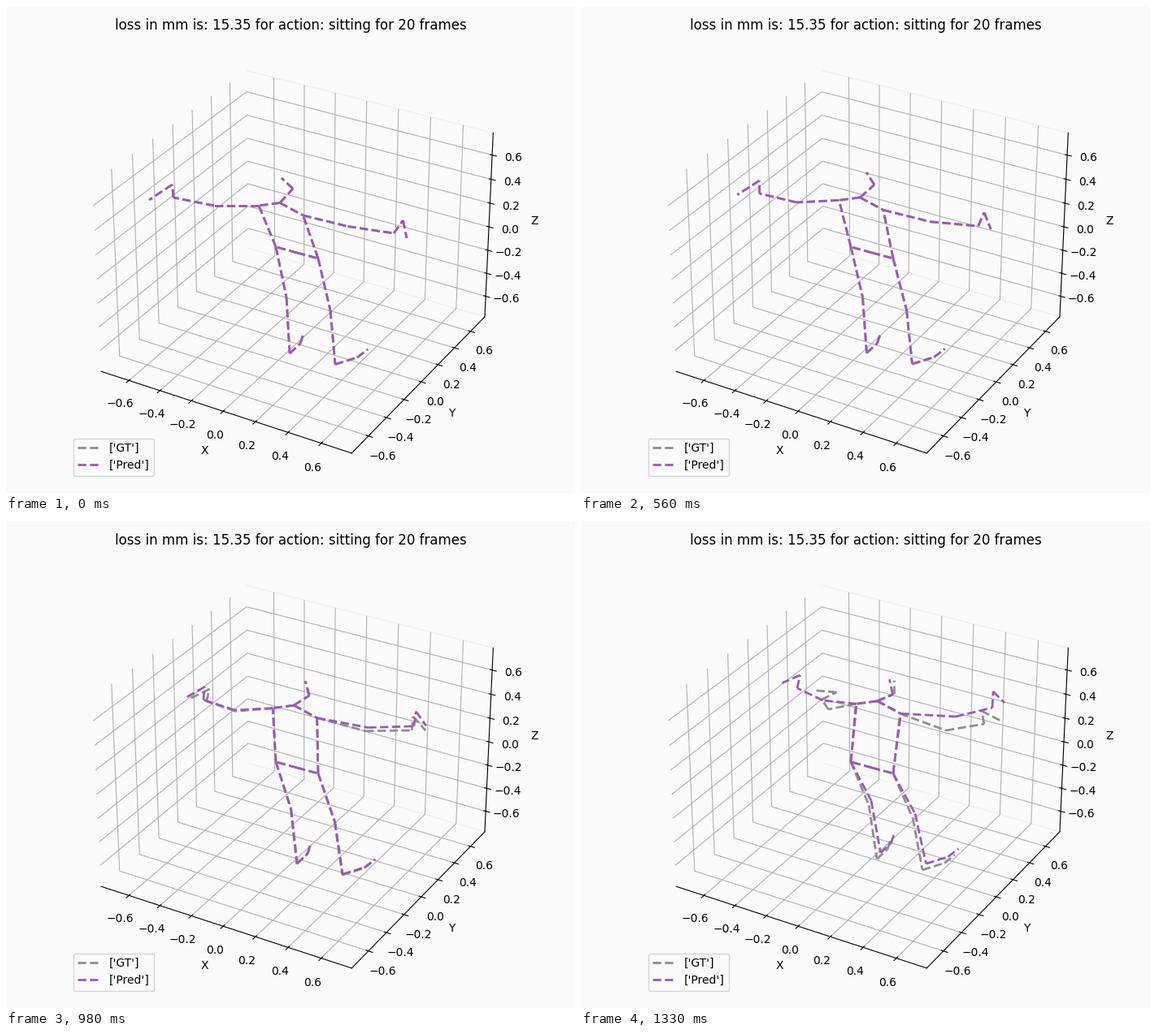
Write a matplotlib script that moves like this. It is 700 by 600 pixels and loops after 1.4 s.

```python
import matplotlib.pyplot as plt
import numpy as np
from matplotlib.animation import FuncAnimation

W, H, STEPS = 700, 600, 20
LAST = STEPS - 1
SPLIT = 11  # step at which the two poses begin to part
BG, GRAY, PURPLE = "#fafafa", "#8e8e8e", "#9b59b6"
STILL = (0, 0)


def ease(u, lead):
    """Quadratic start; a higher lead reaches the end sooner."""
    return u**2 * (1 + np.array(lead) * (1 - u))


def joint(start, shift=STILL, lead=STILL, gap=STILL, power=2.1):
    """Path of one joint in pixels; gap is how far the true pose ends from the predicted one."""
    start, shift, gap = map(np.array, (start, shift, gap))

    def at(step, true):
        point = start + shift * ease(step / LAST, lead)
        if true:
            point = point + gap * (max(step - SPLIT, 0) / (LAST - SPLIT)) ** power
        return point

    return at


# Hips stay fixed and the trunk swings as one piece
joints = {"root": joint((358, 304)), "r_hip": joint((332, 296.8)), "l_hip": joint((384, 311))}
for name, start in {"neck": (337, 242.5), "r_shoulder": (311, 246), "l_shoulder": (365.5, 258)}.items():
    joints[name] = joint(start, (28, -20.7), (0.5, 1.4), (-1, 0))
joints["chin"] = joint((353, 225), (30.5, -11), (0.8, 2.5), (1, -1))
joints["crown"] = joint((339, 212), (40.5, -17), (1.2, 2.3), (5, 1))

# Arms: start, shift and gap of each joint
swing = dict(lead=(0.5, -0.15))
joints["r_elbow"] = joint((256, 246), (41.5, -25), gap=(7, 11), **swing)
joints["r_wrist"] = joint((206, 236), (60, -30), gap=(30, 14), **swing)
joints["r_thumb"] = joint((204.5, 220), (65, -30), gap=(45, 21), **swing)
joints["r_tip"] = joint((176, 239), (71.5, -39.5), gap=(38, 9), **swing)

reach = dict(lead=(2.2, 0), power=1.4)
joints["l_elbow"] = joint((420.5, 271.5), (40.5, -30.5), (0.5, 0.1), (-12, 17), 1.4)
joints["l_wrist"] = joint((477, 280), (29, -50), gap=(-10, 20), **reach)
joints["l_thumb"] = joint((488.5, 264), (18.5, -54), gap=(-14, 24), **reach)
joints["l_tip"] = joint((493, 286), (28, -62), gap=(-3, 23), **reach)

# Legs: knees move less than feet, and the true pose lags behind by a share
LEG = ["knee", "ankle", "foot", "toe"]
leg_starts = {
    "r_": [(345, 359), (349, 428), (362, 416), (365.5, 405)],
    "l_": [(399, 375), (405, 441.5), (432, 433), (445, 423)],
}
for side, starts in leg_starts.items():
    for part, start in zip(LEG, starts):
        dx, dy = (12, -14.5) if part == "knee" else (19.5, -19.3)
        joints[side + part] = joint(start, (dx, dy), (-0.5, -1.5), (-0.23 * dx, -0.4 * dy))

ARM = ["shoulder", "elbow", "wrist", "thumb", "tip"]
bones = [("root", "r_hip"), ("root", "l_hip"),
         ("neck", "r_shoulder"), ("neck", "l_shoulder"),
         ("neck", "chin"), ("chin", "crown")]
for side in ("r_", "l_"):
    for limb in (LEG, ARM):
        chain = [side + part for part in ["hip"] + limb]
        bones += zip(chain, chain[1:])


fig = plt.figure(figsize=(W / 100, H / 100), dpi=100, facecolor=BG)

SIDE = 548.6
ax = fig.add_axes([75.7 / W, 14.5 / H, SIDE / W, SIDE / H], projection="3d")
ax.set_facecolor(BG)
LIM = 0.75 * 25 / 24
ax.set(xlim=(-LIM, LIM), ylim=(-LIM, LIM), zlim=(-LIM, LIM),
       xlabel="X", ylabel="Y", zlabel="Z")
ax.set_title("loss in mm is: 15.35 for action: sitting for 20 frames")
ax.xaxis.pane.set_visible(False)
ax.zaxis.pane.set_visible(False)
ax.yaxis.pane.set_fill(False)

# Pixel-sized layer for the two skeletons
layer = fig.add_axes([0, 0, 1, 1])
layer.set(xlim=(0, W), ylim=(H, 0))
layer.axis("off")


def skeleton(color):
    return [layer.plot([], [], "--", color=color, lw=2)[0] for _ in bones]


true_lines = skeleton(GRAY)
pred_lines = skeleton(PURPLE)
ax.legend([true_lines[0], pred_lines[0]], ["['GT']", "['Pred']"],
          loc="lower left", facecolor=BG)


def update(step):
    for lines, true in ((true_lines, True), (pred_lines, False)):
        for line, (a, b) in zip(lines, bones):
            line.set_data(*zip(joints[a](step, true), joints[b](step, true)))
    return true_lines + pred_lines


anim = FuncAnimation(fig, update, frames=STEPS, interval=70, repeat=True)
plt.show()
```
